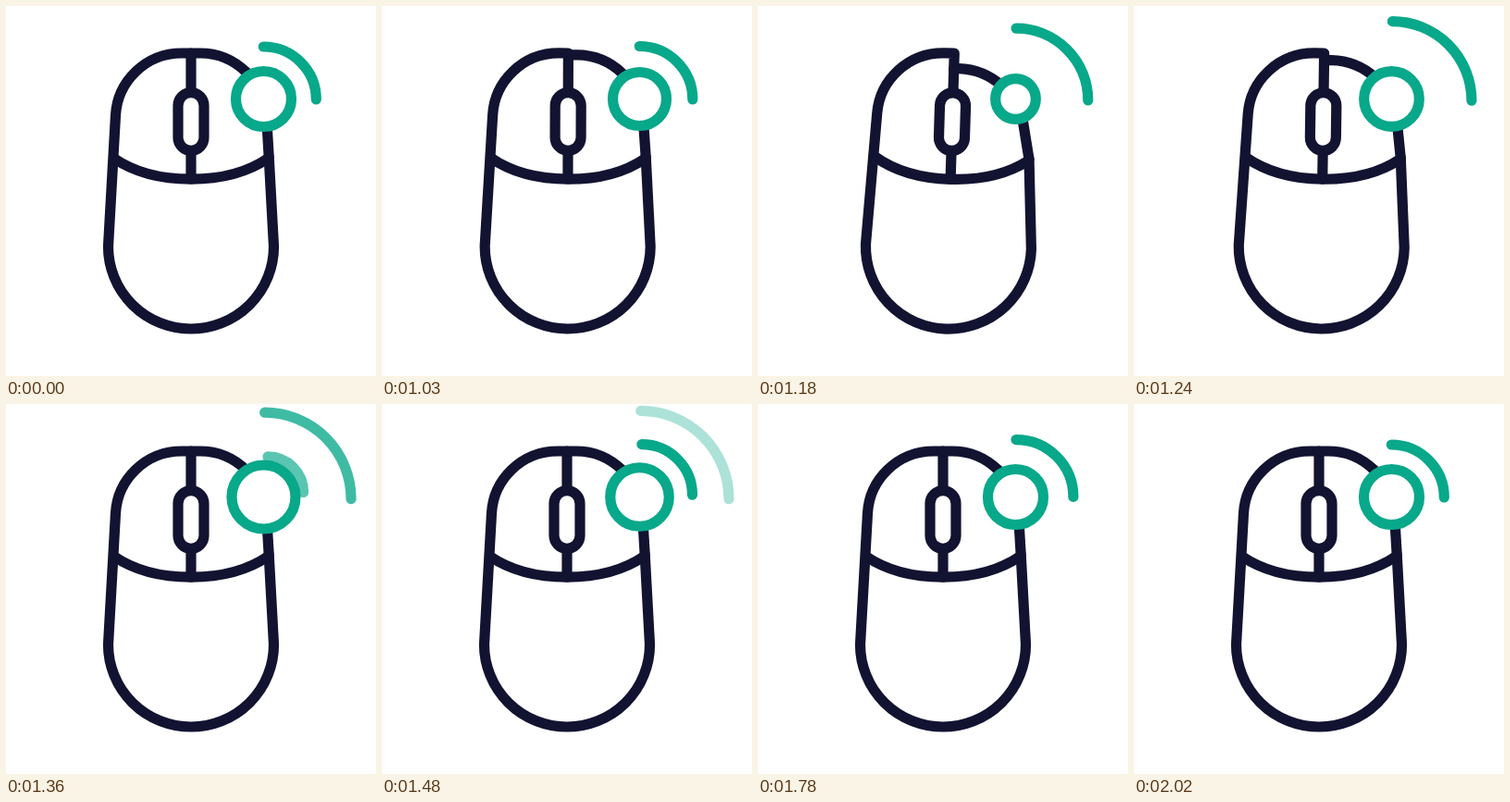
Write an HTML page that moves like this. It is 400x400 px and loops after 2.05 s.

```html
<!DOCTYPE html>
<html lang="en">
<head>
<meta charset="utf-8">
<title>Mouse right click</title>
<style>
  html, body { margin: 0; height: 100%; overflow: hidden; background: #fff; }
  svg { display: block; width: 100%; height: 100%; }
</style>
</head>
<body>
<svg viewBox="0 0 400 400" fill="none" stroke-width="11.2" stroke-linecap="round" stroke-linejoin="round">
  <g stroke="#08a88a">
    <path id="oldWave"/>
    <path id="newWave"/>
  </g>
  <g id="mouse" stroke="#121331">
    <path d="M200 187V157M200 93V51H190C150.500 51 120.500 82 118.500 118L110.500 260A89.500 89 0 0 0 289.500 260L284.200 163"/>
    <path d="M116.500 164.500C139 180 168 187.200 200 187.200S261 180 283.500 164.500"/>
    <rect x="186" y="93.700" width="28" height="62.600" rx="14"/>
    <path id="button"/>
  </g>
  <circle id="ring" cx="278.500" cy="100.500" fill="#fff" stroke="#08a88a"/>
</svg>
<script>
const LOOP = 2050, START = 1000, STEP = 30;
const el = id => document.getElementById(id);
const clamp = x => Math.min(1, Math.max(0, x));
const mix = (a, b, t) => a + (b - a) * t;

// Bezier easing with handles (1/3, 0) and (x2, 1).
function ease(x, x2 = 2 / 3) {
  let lo = 0, hi = 1;
  for (let i = 0; i < 24; i++) {
    const s = (lo + hi) / 2, r = 1 - s;
    if (r * r * s + 3 * x2 * r * s * s + s ** 3 < x) lo = s; else hi = s;
  }
  return lo * lo * (3 - 2 * lo);
}

// Eased value at step k through [step, value] pairs.
function track(k, ...keys) {
  if (k <= keys[0][0]) return keys[0][1];
  for (let i = 1; i < keys.length; i++) {
    const [k0, a] = keys[i - 1], [k1, b] = keys[i];
    if (k < k1) return mix(a, b, ease((k - k0) / (k1 - k0)));
  }
  return keys.at(-1)[1];
}

function wave(node, cx, cy, r, opacity) {
  node.setAttribute('d', `M${cx} ${cy - r}A${r} ${r} 0 0 1 ${cx + r} ${cy}`);
  node.setAttribute('opacity', opacity);
}

function draw(time) {
  const k = Math.max(0, Math.floor((time % LOOP - START) / STEP));

  const p = track(k, [0, 0], [5, 1], [10.4, 0]);
  el('mouse').setAttribute('transform', `rotate(${1.9 * p} 200 457)`);
  const top = 51 + 18 * p;
  el('button').setAttribute('d', `M200 ${top}H${210 - 5 * p}C${248.5 - 8 * p} ${top} ` +
    `${279.3 - 7 * p} ${82.4 + 14 * p} ${281.5 - 5 * p} ${118 + 8 * p}L284.2 163`);

  el('ring').setAttribute('r', track(k, [0, 30], [5, 20.3], [10, 35], [20, 30]));

  const out = ease(clamp(k / 16), 0.28);
  wave(el('oldWave'), mix(278.3, 279.7, out), mix(101, 102.7, out),
    mix(57, 95.3, out), 1 - clamp((k - 10) / 9));
  wave(el('newWave'),
    track(k, [10, 283.4], [20, 279.5], [34, 278.3]),
    track(k, [10, 95], [20, 100], [34, 101]),
    track(k, [10, 35.5], [20, 65], [34, 57]),
    clamp((k - 10) / 3));
}

const begin = performance.now();
function frame() {
  draw(performance.now() - begin);
  requestAnimationFrame(frame);
}
frame();
</script>
</body>
</html>
```
